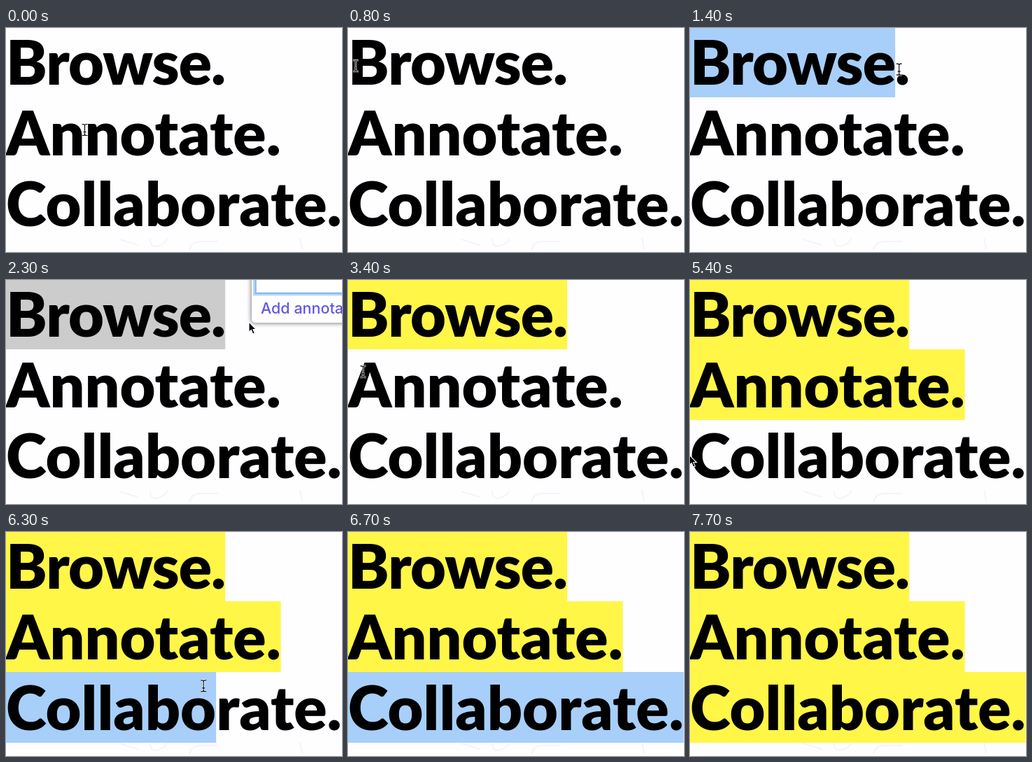
Recreate the animation shown at these times as an HTML page. Size 480 by 320 pixels, loop 8 s.

```html
<!DOCTYPE html>
<html lang="en">
<head>
<meta charset="utf-8">
<title>Browse. Annotate. Collaborate.</title>
<style>
  html, body { margin: 0; width: 100%; height: 100%; overflow: hidden; background: #fefdff; }
  svg { display: block; width: 480px; height: 320px; }
  .words { font: 900 87.8px Lato, sans-serif; }
  .link { font: 500 21.5px Inter, sans-serif; fill: #6258e6; }
  .sketch { fill: none; stroke: #f2f1f4; stroke-width: 1.5; }
</style>
</head>
<body>
<svg viewBox="0 0 480 320">
  <defs>
    <filter id="soft" x="-10%" y="-10%" width="120%" height="120%"><feGaussianBlur stdDeviation="3"/></filter>
    <path id="stem" d="M-4 -8H-2Q0 -8 0 -6Q0 -8 2 -8H4M0 -6V6M-4 8H-2Q0 8 0 6Q0 8 2 8H4M-2 3H2"/>
  </defs>
  <rect width="480" height="320" fill="#fefdff"/>
  <path class="sketch" d="M162 302l26 8M206 301q0 14 12 10t12-11M262 318q2-12 14-13h28M420 300l3 16"/>
  <g id="marks"></g>
  <g id="words" class="words"></g>
  <g id="popup">
    <rect x="3" y="-166" width="260" height="168" rx="5" opacity=".5" filter="url(#soft)"/>
    <rect x="3.5" y="-166" width="260" height="167.5" rx="5" fill="#fff" stroke="#b9b8bc"/>
    <rect x="8.5" y="-150" width="240" height="110" fill="#fff" stroke="#b7d8f8" stroke-width="5"/>
    <rect x="9.5" y="-150" width="239" height="109" fill="none" stroke="#85b9ee" stroke-width="2"/>
    <text class="link" x="17" y="-12">Add annotation</text>
  </g>
  <path id="arrow" d="M0 0V14.5L3.3 11.500L5.7 17L8.3 15.9L5.9 10.500H10.3Z" stroke="#fff" stroke-width="1.1"/>
  <g id="beam" fill="none">
    <use href="#stem" stroke="#fff" stroke-width="2.6"/>
    <use href="#stem" stroke="#000" stroke-width="1.1"/>
  </g>
</svg>
<script>
const LOOP = 8000, STEP = 100, PITCH = 101;
const BLUE = '#a7cff9', GRAY = '#cdcccd', YELLOW = '#fff647';
const $ = id => document.getElementById(id);

function add(parent, tag, attrs) {
  const el = document.createElementNS('http://www.w3.org/2000/svg', tag);
  for (const k in attrs) el.setAttribute(k, attrs[k]);
  return parent.appendChild(el);
}

// drag: selection starts, open: popup appears, blur: selection turns gray, save: highlight is kept
const lines = [
  { word: 'Browse.', spacing: -0.9, drag: 1100, open: 2000, blur: 2000, save: 2400 },
  { word: 'Annotate.', spacing: 0, drag: 3600, open: 4500, blur: 4700, save: 4800 },
  { word: 'Collaborate.', spacing: 0, drag: 6200, open: 7000, blur: 7000, save: 7600 }
];
lines.forEach((l, i) => {
  l.bottom = 99 + PITCH * i;
  l.mark = add($('marks'), 'rect', { x: 0, y: l.bottom - PITCH, height: PITCH });
  l.text = add($('words'), 'text', { x: 0, y: l.bottom - 18.2, 'letter-spacing': l.spacing });
  l.text.textContent = l.word;
});

const smooth = p => p * p * (3 - 2 * p);
const out = power => p => 1 - (1 - p) ** power;
const mix = (a, b, k) => a + (b - a) * k;

// Pointer moves along a curve: begin, end, target, bend (sideways lift), easing
const home = [112.5, 145.5];
const moves = [
  { begin: 100, end: 800, to: [11, 54], lift: 0, ease: smooth },
  { begin: 1000, end: 1900, to: [347, 60], lift: 0, ease: out(3.3) },
  { begin: 2600, end: 3500, to: [10, 143], lift: 70, ease: smooth },
  { begin: 3500, end: 4400, to: [460, 145], lift: 50, ease: out(3.3) },
  { begin: 4600, end: 4900, to: [384, 119], lift: 0, ease: smooth },
  { begin: 5100, end: 5400, to: [-1, 250], lift: 0, ease: smooth },
  { begin: 5400, end: 5800, to: [10, 251], lift: 0, ease: smooth },
  { begin: 6100, end: 6700, to: [500, 195], lift: 0, ease: out(2) }
];

function pointer(t) {
  let [x, y] = home;
  for (const m of moves) {
    if (t < m.begin) break;
    const k = m.ease(Math.min(1, (t - m.begin) / (m.end - m.begin)));
    x = mix(x, m.to[0], k);
    y = mix(y, m.to[1], k) - m.lift * 4 * k * (1 - k);
  }
  return [x, y];
}

// Character edge closest to x
function snap(text, x) {
  let best = 0;
  for (let i = 1; i <= text.getNumberOfChars(); i++) {
    const edge = text.getSubStringLength(0, i);
    if (Math.abs(edge - x) < Math.abs(best - x)) best = edge;
  }
  return best;
}

function place(el, shown, [x, y]) {
  el.setAttribute('display', shown ? 'inline' : 'none');
  el.setAttribute('transform', `translate(${x} ${y})`);
}

function draw(now) {
  const t = Math.floor(now % LOOP / STEP) * STEP;
  const at = pointer(t), [x, y] = at;
  for (const l of lines) {
    const full = l.text.getComputedTextLength();
    l.mark.setAttribute('width', t < l.drag ? 0 : t < l.open ? snap(l.text, x) : full);
    l.mark.setAttribute('fill', t >= l.save ? YELLOW : t >= l.blur ? GRAY : BLUE);
  }

  const active = lines.find(l => t >= l.open && t <= l.save);
  place($('popup'), active, active ? pointer(active.open) : home);
  $('popup').setAttribute('opacity', active && t >= active.save ? 0.5 : 1);

  const row = lines.find(l => y < l.bottom);
  const overText = x > 2 && x < row.text.getComputedTextLength();
  place($('beam'), overText, at);
  place($('arrow'), !overText, at);
}

const start = performance.now();
function tick() {
  draw(performance.now() - start);
  requestAnimationFrame(tick);
}
tick();
</script>
</body>
</html>
```
